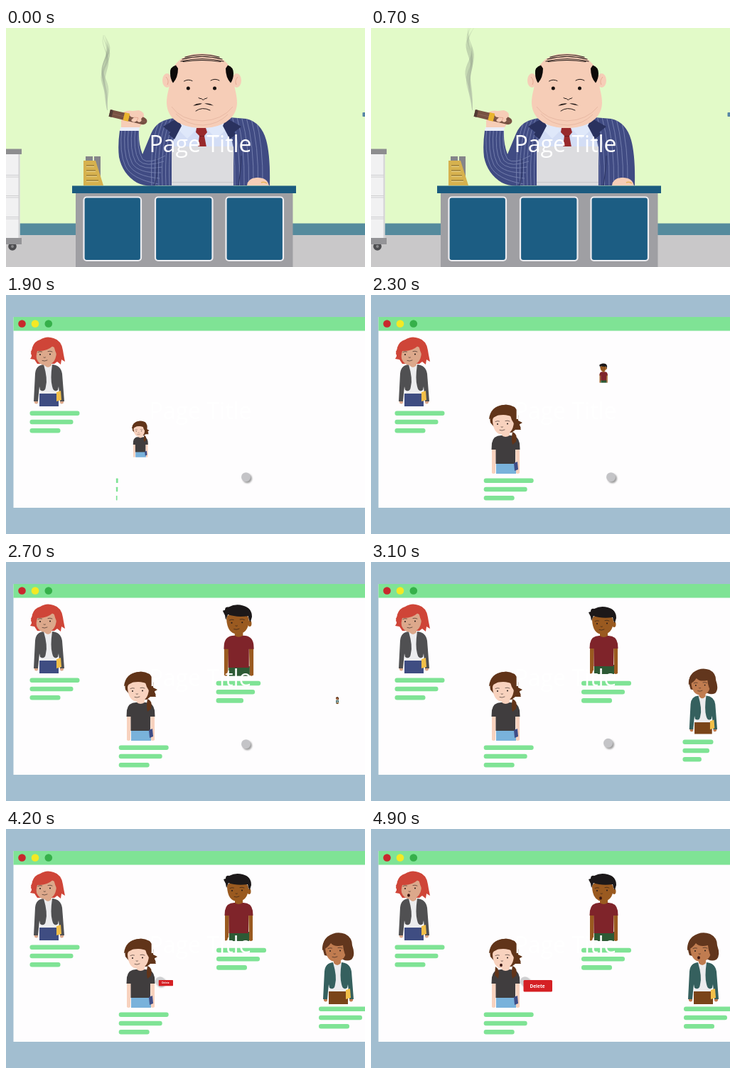
Write an HTML page that moves like this. It is 505 by 337 pixels and loops after 5 s.

```html
<!DOCTYPE html>
<html lang="en">
<head>
<meta charset="utf-8">
<title>Page Title</title>
<style>
html, body { margin: 0; width: 100%; height: 100%; overflow: hidden; background: #a2bed0; }
svg { display: block; width: 505px; height: 337px; }
text { font-family: "Open Sans", "Noto Sans", sans-serif; fill: #fff; }
.line { fill: none; stroke: #241a18; stroke-linecap: round; }
#cursor { filter: drop-shadow(2px 2px 1.3px rgba(60, 60, 60, .5)); }
</style>
</head>
<body>
<svg viewBox="0 0 505 337">
  <defs>
    <clipPath id="suitClip"><path d="M160 144Q157 166 159 182Q164 206 184 218Q196 224 212 222L371 222Q372 180 366 158Q359 133 338 128L314 126L238 127Q212 129 204 149L192 178Q186 163 187 144Z"/></clipPath>
    <linearGradient id="fade" x1="0" y1="0" x2="0" y2="1">
      <stop offset="0" stop-color="#8d9a86" stop-opacity=".15"/>
      <stop offset=".25" stop-color="#8d9a86" stop-opacity=".4"/>
      <stop offset="1" stop-color="#a9b3a3" stop-opacity=".35"/>
    </linearGradient>
  </defs>

  <g id="office">
    <rect width="505" height="337" fill="#e2fac8"/>
    <rect y="275.500" width="505" height="17" fill="#558b9d"/>
    <rect y="292" width="505" height="45" fill="#c9c8c9"/>
    <rect x="501.500" y="119" width="6" height="6" rx="1" fill="#5685a5"/>

    <g id="cabinet">
      <rect y="178" width="19.500" height="119" fill="#f1f1f2"/>
      <rect x="17.500" y="178" width="2" height="119" fill="#d2d2d4"/>
      <path d="M0 207.500H18M0 210H18M0 236.500H18M0 239H18M0 266.500H18M0 269H18" stroke="#cfcfd1"/>
      <rect y="170.500" width="22" height="7.500" fill="#8d8d8f"/>
      <circle cx="9" cy="308" r="5.800" fill="#4d4d50"/>
      <rect y="296" width="22" height="9" fill="#949497"/>
      <circle cx="9" cy="308" r="2" fill="#88888b"/>
    </g>

    <g id="smoke" fill="url(#fade)"></g>

    <g clip-path="url(#suitClip)">
      <rect x="150" y="120" width="230" height="105" fill="#404b83"/>
      <g id="stripes" fill="none" stroke="#7883b0" stroke-width=".9"></g>
      <path d="M209 222Q214 205 212 184M327 222Q331 195 331 180" fill="none" stroke="#2d3665" stroke-width="1.200"/>
    </g>
    <path d="M242 127H311L320 170H233Z" fill="#d3ddf5"/>
    <path d="M246 127L241 142L255 156L270 141ZM306 127L311 142L296 156L281 141Z" fill="#dfe8fa"/>
    <path d="M241 127L221 139L231 147L229 150L237 157L247 138ZM310 127L331 139L321 147L323 150L315 157L305 138Z" fill="#2a325f"/>
    <path d="M268 141H281L283 147L279 152L282 168H270L272 152L267 147Z" fill="#98292b"/>
    <path d="M272 152.500H279" stroke="#6f1c22"/>

    <g id="boss">
      <ellipse cx="226.500" cy="74" rx="6.500" ry="10" fill="#f6cdb7"/>
      <ellipse cx="324.500" cy="74" rx="6.500" ry="10" fill="#f6cdb7"/>
      <path d="M225 69Q230 74 227 80M326 69Q321 74 324 80" fill="none" stroke="#e5aa94"/>
      <path d="M231 74C232 52 246 36 275 36C304 36 319 52 320 74C321 85 325 93 325 106C324 131 300 141 276 141C250 141 227 131 226 106C226 93 230 85 231 74Z" fill="#f6cdb7"/>
      <path d="M233 111Q246 130 276 131Q304 130 319 111M239 121Q254 137 277 137Q298 136 312 122" fill="none" stroke="#e8b9a4"/>
      <path d="M239 52.500Q230 55 231 64Q231 72 235 77.500Q242 70 242 57ZM312 52.500Q320 55 320 64Q320 72 316 77.500Q309 70 309 57Z" fill="#0d0a09"/>
      <path class="line" stroke-width="1.200" d="M252 41Q276 34.500 300 41M248 44Q276 36.500 304 44M246 47Q276 40 306 47M249 47.500Q276 43.500 302 47.500"/>
      <path class="line" stroke-width="1" d="M250.500 75Q256 71.500 262 74.500M288 74Q294 70.500 300 74M271 98.500Q273 100 275 99.500Q277 103 280 99.500Q282 100 283 98.500M267 117Q276 110.500 287 116"/>
      <circle cx="256.300" cy="85" r="2.500" fill="#17110f"/>
      <circle cx="293.500" cy="85" r="2.500" fill="#17110f"/>
      <path d="M263 109.500Q269 105.500 276 106.500Q271 109 263 109.500ZM279 106.500Q286 105 292 109.500Q285 108.500 279 106.500Z" fill="#241a18"/>
    </g>

    <path d="M162 141L162 123Q166 115 178 117L187 116Q195 118 194 126L192 135L187 141Z" fill="#f6cdb7"/>
    <path d="M161 140H188L187 145H160Z" fill="#e9edf8"/>
    <g transform="translate(146 119) rotate(13.500)">
      <path d="M0 -4L46 -4.500Q54 -4 54 1Q53 6 47 6L0 6Z" fill="#775142"/>
      <path d="M0 -4L4 -4V6H0Z" fill="#503a34"/>
      <path d="M5 1H52" stroke="#8b6354"/>
      <rect x="20.500" y="-5" width="7.500" height="11.500" fill="#e9b42e"/>
    </g>
    <path d="M174 121Q176 118 181 119L191 122Q194 125 190 128Q192 132 187 133L184 131Q179 135 176 130L180 126Q173 126 174 121Z" fill="#f6cdb7"/>
    <path d="M180 126L186 126.500M184 131L186 127" stroke="#e4aa93"/>

    <rect x="233" y="167" width="87" height="56" rx="1" fill="#dcdcdf"/>
    <path d="M233 217.500H320" stroke="#c6c6ca"/>
    <path d="M339 222Q340 212 352 211Q367 210 370 222Z" fill="#f6cdb7"/>
    <path d="M359 218Q363 216 367 219" fill="none" stroke="#e9b45a" stroke-width="1.500"/>

    <g id="tray">
      <path d="M112 181H122V200H112ZM124 181H133V214H124Z" fill="#85858a"/>
      <path d="M109 222V187H126L137 222Z" fill="#d6b14e"/>
      <path d="M113 194H124M113 201H126M113 208H128M113 215H130" stroke="#957a37" stroke-width="1.400"/>
      <path d="M113 195.300H124M113 202.300H126M113 209.300H128M113 216.300H130" stroke="#f1dc93"/>
    </g>

    <rect x="98" y="232" width="305.500" height="105" fill="#9f9fa3"/>
    <rect x="93" y="222.500" width="315" height="10.500" fill="#1b5b7f"/>
    <g fill="#1c5d83" stroke="#ededf1" stroke-width="2.200">
      <rect x="109.500" y="238.500" width="80.500" height="89.500" rx="4"/>
      <rect x="210" y="238.500" width="80.500" height="89.500" rx="4"/>
      <rect x="309.500" y="238.500" width="80.500" height="89.500" rx="4"/>
    </g>
  </g>

  <g id="browser">
    <rect width="505" height="337" fill="#a2bed0"/>
    <rect x="10.500" y="31" width="500" height="269" fill="#fefdfe"/>
    <rect x="10.500" y="31" width="500" height="19.500" fill="#7fe395"/>
    <circle cx="22.500" cy="40.500" r="5.300" fill="#c8282d"/>
    <circle cx="41" cy="40.500" r="5.300" fill="#f4e924"/>
    <circle cx="59.800" cy="40.500" r="5.300" fill="#36b04a"/>
    <g id="people"></g>
    <g id="cursor"><circle r="6.500" fill="#c4c4c7"/></g>
    <g id="delete">
      <rect x="214.500" y="213" width="40.500" height="16.500" rx="1.500" fill="#d52024"/>
      <text x="234" y="223.800" font-size="6.500" font-weight="700" text-anchor="middle">Delete</text>
    </g>
  </g>

  <text x="201.500" y="175" font-size="32">Page Title</text>
</svg>

<script>
const LOOP = 5000, STEP = 100, CUT = 900, GASP = 4500;
const $ = id => document.getElementById(id);
const clamp = v => Math.max(0, Math.min(1, v));
const ease = p => p * p * (3 - 2 * p);
const fill = (color, d) => `<path d="${d}" fill="${color}"/>`;

// pin stripes: bent sleeve, both chest halves, right sleeve
let lines = '';
for (let k = 0; k < 6; k++) {
  const x = 163 + k * 4.8;
  lines += `M${x} 140Q${x - 4} ${176 - k} ${x + 5} ${195 - k * 2}Q${x + 14} ${213 - k * 4} ${214 + k * 2} ${220 - k * 8}`;
}
for (let k = 0; k < 7; k++) {
  const x = 205 + k * 5, r = 318 + k * 6.5;
  lines += `M${x + 12} 128Q${x - 3} 160 ${x} 222M${r - 6} 126Q${r + 5} 165 ${r + 4} 222`;
}
$('stripes').innerHTML = `<path d="${lines}"/>`;

const face = (x, y, skin, gaspDy) => `<g transform="translate(${x} ${y})">
  <path d="M-15 -5Q-15 -13 0 -13Q15 -13 15 -3Q14 15 -1 15Q-14 14 -15 -5Z" fill="${skin}"/>
  <circle cx="-8" cy="0" r="1" fill="#241a18"/><circle cx="6" cy="-.5" r="1" fill="#241a18"/>
  <path class="line" stroke-width=".6" d="M-11 -3.500Q-8 -5 -5.500 -4M3 -4.500Q6 -5.500 9 -4M-3 4Q-2 5 -.5 4"/>
  <path class="calm line" stroke-width=".6" d="M-5 8.500Q-2 10 2 8"/>
  <ellipse class="gasp" cx="-3" cy="${gaspDy}" rx="1.900" ry="2.300" fill="#3b1713"/></g>`;

const cardigan = (x, y, coat, skin, legs) =>
  fill(skin, `M${x - 19} ${y + 49}h5v4q-2 3 -5 0ZM${x + 17} ${y + 49}h5v4q-3 3 -5 0Z`) +
  fill('#ececee', `M${x - 8} ${y}H${x + 9}L${x + 13} ${y + 42}H${x - 11}Z`) +
  fill(legs, `M${x - 12} ${y + 40}H${x + 15}V${y + 58}H${x - 12}Z`) +
  fill(skin, `M${x - 5} ${y - 5}H${x + 5}L${x + 5} ${y}Q${x} ${y + 6} ${x - 5} ${y}Z`) +
  fill(coat, `M${x - 6} ${y - 1}Q${x - 17} ${y} ${x - 18} ${y + 12}L${x - 20} ${y + 51}h6L${x - 12} ${y + 30}L${x - 11} ${y + 35}Q${x - 4} ${y + 39} ${x - 3} ${y + 30}Q${x} ${y + 20} ${x - 6} ${y - 1}Z`) +
  fill(coat, `M${x + 6} ${y - 1}Q${x + 18} ${y} ${x + 20} ${y + 12}L${x + 23} ${y + 51}h-6L${x + 15} ${y + 30}L${x + 14} ${y + 35}Q${x + 8} ${y + 39} ${x + 6} ${y + 30}Q${x + 3} ${y + 20} ${x + 6} ${y - 1}Z`) +
  fill('#f2bf49', `M${x + 12} ${y + 38}L${x + 18} ${y + 36}L${x + 19} ${y + 49}L${x + 12} ${y + 51}Z`);

const tee = (x, y, shirt, skin, legs, sleeve, hem) =>
  fill(skin, `M${x - 19} ${y + 12}h6L${x - 14} ${y + 53}q-3 2 -5 0ZM${x + 14} ${y + 12}h6L${x + 20} ${y + 53}q-3 2 -5 0Z`) +
  fill(legs, `M${x - 13} ${y + hem - 2}H${x + 15}V${y + 54}H${x - 13}Z`) +
  fill(shirt, `M${x - 6} ${y}Q${x - 17} ${y} ${x - 19} ${y + 11}L${x - 19.5} ${y + sleeve}h6V${y + hem}H${x + 14}V${y + sleeve}h6.500L${x + 20} ${y + 11}Q${x + 18} ${y} ${x + 7} ${y}Z`) +
  fill(skin, `M${x - 5} ${y - 6}H${x + 6}V${y}Q${x} ${y + 4} ${x - 5} ${y}Z`);

const people = [
  { at: 1092, mid: [58, 107], bar: [33.5, 166.8], art:
    fill('#cf4538', 'M44 97L40 91L34 90Q38 85 35 80Q37 77 37 74Q40 65 48 63Q57 57 67 61Q78 64 80 78L81 84L83 94L78 91L77 98L72 94L68 97Z') +
    cardigan(59, 99, '#505052', '#dca88b', '#3f4d82') +
    face(56, 84, '#dca88b', 9.5) +
    fill('#cf4538', 'M35 83Q38 67 52 63Q70 61 75 78L78 93Q71 88 67 71Q57 80 44 79Q42 86 43 91Q38 89 35 83Z') },
  { at: 1642, mid: [189, 203], bar: [158.7, 261.8], art:
    fill('#613419', 'M168 180Q165 166 177 158Q190 151 202 158Q209 165 207 177L213 180L208 183L211 190L203 190L198 194H180Z') +
    tee(189, 198, '#403d3e', '#f8d2be', '#79b2db', 20, 40) +
    fill('#3f4d86', 'M201 237L206 235L207 246L202 248Z') +
    fill('#613419', 'M199 193Q207 196 204 207L199 211Q197 203 199 193Z') +
    '<path class="gasp" d="M175 194Q182 198 179 211L174 206Z" fill="#613419"/>' +
    face(186, 182, '#f8d2be', 10) +
    fill('#613419', 'M166 175Q168 157 186 155Q202 156 205 173L211 188Q199 184 196 170Q187 169 182 165Q179 171 166 175Z') },
  { at: 2160, mid: [327, 110], bar: [296, 171], art:
    tee(327, 104, '#7f242a', '#9a5a20', '#2d5a35', 18, 43) +
    face(326, 87, '#9a5a20', 10.5) +
    '<ellipse cx="342" cy="88" rx="2.500" ry="4" fill="#9a5a20"/>' +
    fill('#1c1819', 'M310 83L309 77L306 71L309 70Q309 65 314 66Q323 61 333 64Q345 67 345 79L343 86Q341 84 340 78Q324 80 313 76Z') },
  { at: 2652, mid: [466, 195], bar: [440, 253.8], art:
    fill('#62361d', 'M448 178Q442 161 452 152Q464 143 477 148Q487 153 487 164Q492 178 486 184Q480 187 474 184Z') +
    cardigan(466, 189, '#35605e', '#c07c50', '#7a4419') +
    face(464, 172, '#c07c50', 9.5) +
    fill('#62361d', 'M445 171Q444 153 462 148Q480 148 483 166Q485 178 482 185Q475 177 474 164Q462 167 457 161Q453 167 445 171Z') },
];

$('people').innerHTML = people.map(p => `<g>${p.art}</g>` +
  [0, 1, 2].map(() => '<rect height="6.600" fill="#7fe395"/>').join('')).join('');
const kids = [...$('people').children];
const scaleAt = (x, y, s) => `translate(${x} ${y}) scale(${s}) translate(${-x} ${-y})`;
const show = (el, on) => el.style.display = on ? '' : 'none';

function drawPerson(p, i, t) {
  const d = t - p.at, [x, y] = p.mid, body = kids[i * 4];
  const size = d < 520 ? 1.06 * clamp(d / 520) : 1.06 - .06 * ease(clamp((d - 520) / 120));
  show(body, d > 0);
  body.setAttribute('transform', scaleAt(x, y, size));
  const grow = clamp((d - 245) / 330);
  [70, 61, 43].forEach((w, k) => {
    const bar = kids[i * 4 + 1 + k];
    bar.setAttribute('x', p.bar[0] - 4 * (1 - grow));
    bar.setAttribute('y', p.bar[1] - 3.3 + k * 12.2);
    bar.setAttribute('width', w * grow);
    bar.setAttribute('rx', Math.min(3, w * grow / 4));
  });
}

function drawSmoke(t) {
  const phase = .19 + t * .00111;
  $('smoke').innerHTML = [0, .1, .25].map((shift, i) => {
    const left = [], right = [];
    for (let u = 0; u <= 1.001; u += .04) {
      const x = 142.5 - 4 * Math.sin(u * 3) + 5.5 * u * Math.sin(2 * Math.PI * (1.8 * u - phase + shift));
      const w = .7 + (8 - i) * Math.sin(Math.PI * u) * (.55 + .45 * Math.sin(9 * u + i * 2 - phase * 3));
      const y = 116 - u * (106 + 10 * clamp(t / 700));
      left.push(`${(x - w / 2).toFixed(1)} ${y.toFixed(1)}`);
      right.unshift(`${(x + w / 2).toFixed(1)} ${y.toFixed(1)}`);
    }
    return `<path d="M${left.concat(right).join('L')}Z"/>`;
  }).join('');
}

function draw(t) {
  const office = t < CUT;
  show($('office'), office);
  show($('browser'), !office);
  if (office) return drawSmoke(t);
  people.forEach((p, i) => drawPerson(p, i, t));
  const move = ease(clamp((t - 3000) / 920));
  $('cursor').setAttribute('transform', `translate(${337.5 - 121 * move} ${256.7 - 42 * move})`);
  $('cursor').setAttribute('opacity', 1 - .2 * clamp((t - 3950) / 200));
  const pop = ease(clamp((t - 4050) / 300));
  show($('delete'), pop > 0);
  $('delete').setAttribute('transform', scaleAt(215, 213, pop));
  document.querySelectorAll('.calm').forEach(el => show(el, t < GASP));
  document.querySelectorAll('.gasp').forEach(el => show(el, t >= GASP));
}

const start = performance.now();
function tick() {
  const t = (performance.now() - start) % LOOP;
  draw(Math.floor(t / STEP) * STEP);
  requestAnimationFrame(tick);
}
tick();
</script>
</body>
</html>
```
